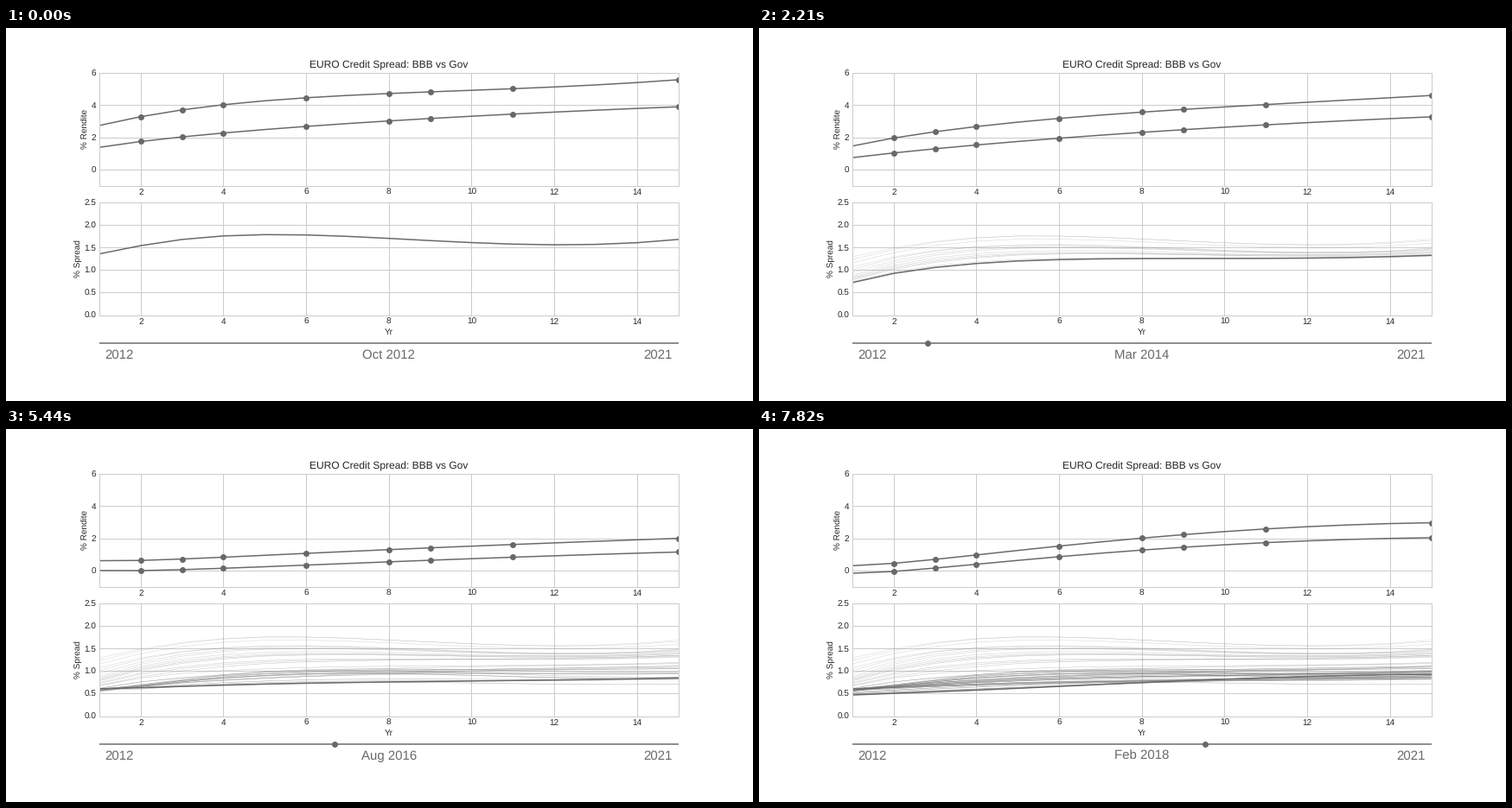
Animation, 864 px wide and 432 px high, one loop 7.99 s. Source, as a matplotlib script:

```python
import numpy as np
import matplotlib.pyplot as plt
from matplotlib.animation import FuncAnimation

FRAMES, STEP_MS = 47, 170
GRAY = "dimgray"
MONTHS = "Jan Feb Mar Apr May Jun Jul Aug Sep Oct Nov Dec".split()

plt.rcParams.update({
    "font.family": "Liberation Sans",
    "font.size": 10,
    "text.color": ".15",
    "text.hinting": "none",
    "axes.labelcolor": ".15",
    "axes.labelsize": 10,
    "axes.labelpad": 2.5,
    "axes.titlesize": 12,
    "axes.edgecolor": ".8",
    "axes.linewidth": 1,
    "axes.grid": True,
    "axes.axisbelow": True,
    "grid.color": ".8",
    "grid.linewidth": 1,
    "xtick.color": ".15",
    "ytick.color": ".15",
    "xtick.major.size": 0,
    "ytick.major.size": 0,
    "lines.linewidth": 1.5,
    "lines.markersize": 7,
    "lines.markeredgewidth": 0,
    "lines.solid_capstyle": "round",
})

steps = np.arange(FRAMES)
years = np.arange(1, 16)
quoted = [1, 2, 3, 5, 7, 8, 10, 14]   # indices of the maturities with a dot

# turning points of the market: step and months since the start
turns = [0, 7, 19, 26, 32, 40, 46]
month = np.interp(steps, turns, [0, 9, 26, 37, 46, 56, 64])

# swing is 0 at each turning point and 1 halfway between two
swing = np.sin(np.pi * (np.interp(steps, turns, range(len(turns))) % 1))


def curves(knots, *levels):
    """Polynomial in sqrt(maturity) for each step; one level list per knot."""
    rows = [np.interp(steps, turns, lev) for lev in levels]
    coef = np.polyfit(np.sqrt(knots), np.array(rows), len(knots) - 1)
    return (np.vander(np.sqrt(years), len(knots)) @ coef).T


gov = curves([1, 4, 8, 15],
             [1.38, 0.98, 0.46, 0.18, 0.00, -0.05, -0.17],
             [2.27, 2.07, 0.82, 0.69, 0.14, 0.46, 0.39],
             [3.02, 2.98, 1.32, 1.33, 0.54, 1.24, 1.27],
             [3.90, 3.83, 2.12, 1.92, 1.15, 2.03, 2.04])
spread = curves([1, 3, 6, 10, 15],
                [1.36, 0.88, 0.55, 0.59, 0.61, 0.58, 0.47],
                [1.68, 1.33, 0.74, 0.80, 0.66, 0.72, 0.54],
                [1.78, 1.50, 0.88, 1.01, 0.73, 0.86, 0.66],
                [1.61, 1.41, 1.00, 0.96, 0.78, 0.93, 0.82],
                [1.68, 1.44, 1.08, 0.87, 0.85, 1.02, 0.93])

# between turning points yields bulge upwards and spreads shift and tilt
shift, tilt = np.random.default_rng(4).normal(0, 0.05, (2, FRAMES)) * swing
gov += 0.3 * np.outer(swing, years / 15)
spread += shift[:, None] * np.minimum(years / 5, 1) + np.outer(tilt, years / 15)
bbb = gov + spread


def date_label(k):
    m = int(month[k] + 0.01) + 9
    return f"{MONTHS[m % 12]} {2012 + m // 12}"


fig, (top, mid, bar) = plt.subplots(
    3, 1, figsize=(12, 6), dpi=72,
    gridspec_kw=dict(height_ratios=[4, 4, 1], hspace=0.2,
                     left=0.125, right=0.9, top=0.8794, bottom=0.1094))

top.set(xlim=(1, 15), ylim=(-1, 6), yticks=[0, 2, 4, 6], ylabel="% Rendite")
top.set_title("EURO Credit Spread: BBB vs Gov", pad=6)
mid.set(xlim=(1, 15), ylim=(0, 2.5), yticks=np.arange(0, 2.6, 0.5),
        xlabel="Yr", ylabel="% Spread")

dotted = dict(color=GRAY, marker="o", markevery=quoted)
gov_line, = top.plot(years, gov[0], **dotted)
bbb_line, = top.plot(years, bbb[0], **dotted)

# past spreads, fainter the older they are
trail = [mid.plot(years, s, color=GRAY, lw=0.5, alpha=0.25 + 0.45 * k / FRAMES)[0]
         for k, s in enumerate(spread)]
spread_line, = mid.plot(years, spread[0], color=GRAY)

# timeline
bar.set(xlim=(4, 73), ylim=(0, 1))
bar.axis("off")
bar.plot([4, 73], [0.6, 0.6], color=GRAY)
knob, = bar.plot([0], [0.6], "o", color=GRAY)


def caption(x, text, ha):
    return bar.text(x, 0.07, text, ha=ha, size=15, color=GRAY,
                    transform=bar.transAxes)


caption(0.01, "2012", "left")
caption(0.99, "2021", "right")
date = caption(0.5, "", "center")


def draw(k):
    gov_line.set_ydata(gov[k])
    bbb_line.set_ydata(bbb[k])
    spread_line.set_ydata(spread[k])
    for i, line in enumerate(trail):
        line.set_visible(0 < i <= k)
    knob.set_xdata([k])
    date.set_text(date_label(k))


anim = FuncAnimation(fig, draw, frames=FRAMES, interval=STEP_MS,
                     init_func=lambda: draw(0), repeat=True, repeat_delay=0)
plt.show()
```
